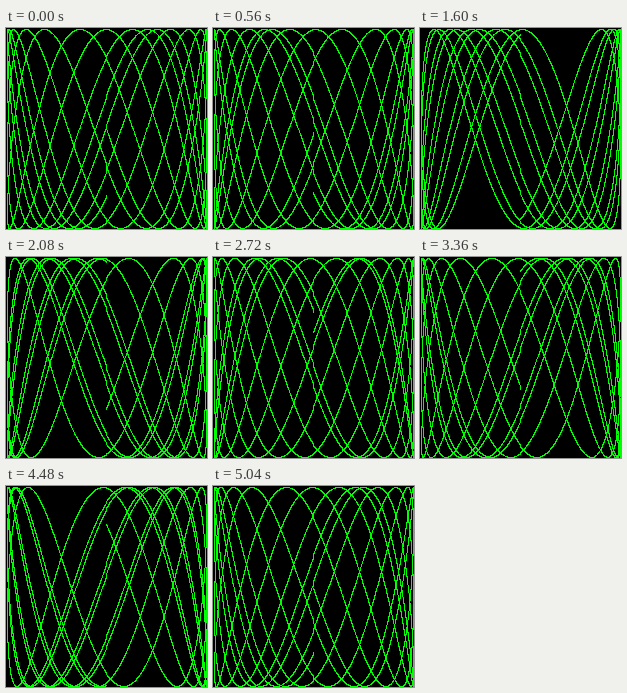
Animation of 201x201 px, one loop 5120 ms. Source, as an HTML page with a canvas:

```html
<!DOCTYPE html>
<html lang="en">
<head>
<meta charset="utf-8">
<title>Lissajous</title>
<style>
  html, body { margin: 0; height: 100%; overflow: hidden; background: #000; }
  canvas { display: block; width: 100vw; height: 100vh; image-rendering: pixelated; }
</style>
</head>
<body>
<canvas width="201" height="201"></canvas>
<script>
const SIZE = 100, WIDTH = 2 * SIZE + 1;
const CYCLES = 5, RESOLUTION = 0.001, FREQUENCY = 2.8766;
const STEPS = 64, STEP_MS = 80, PHASE_STEP = 0.1;
const BLACK = 0xff000000, GREEN = 0xff00ff00; // ABGR

const ctx = document.querySelector('canvas').getContext('2d');
const image = ctx.createImageData(WIDTH, WIDTH);
const pixels = new Uint32Array(image.data.buffer);

// Rounds by truncating toward zero, which leaves row and column 0 empty.
const toPixel = v => SIZE + Math.trunc(v * SIZE + 0.5);

function draw(phase) {
  pixels.fill(BLACK);
  for (let t = 0; t < CYCLES * 2 * Math.PI; t += RESOLUTION) {
    const x = toPixel(Math.sin(t));
    const y = toPixel(Math.sin(t * FREQUENCY + phase));
    pixels[y * WIDTH + x] = GREEN;
  }
  ctx.putImageData(image, 0, 0);
}

let shown = -1;
function tick() {
  const step = Math.floor(performance.now() / STEP_MS) % STEPS;
  if (step !== shown) draw((shown = step) * PHASE_STEP);
  requestAnimationFrame(tick);
}
tick();
</script>
</body>
</html>
```
